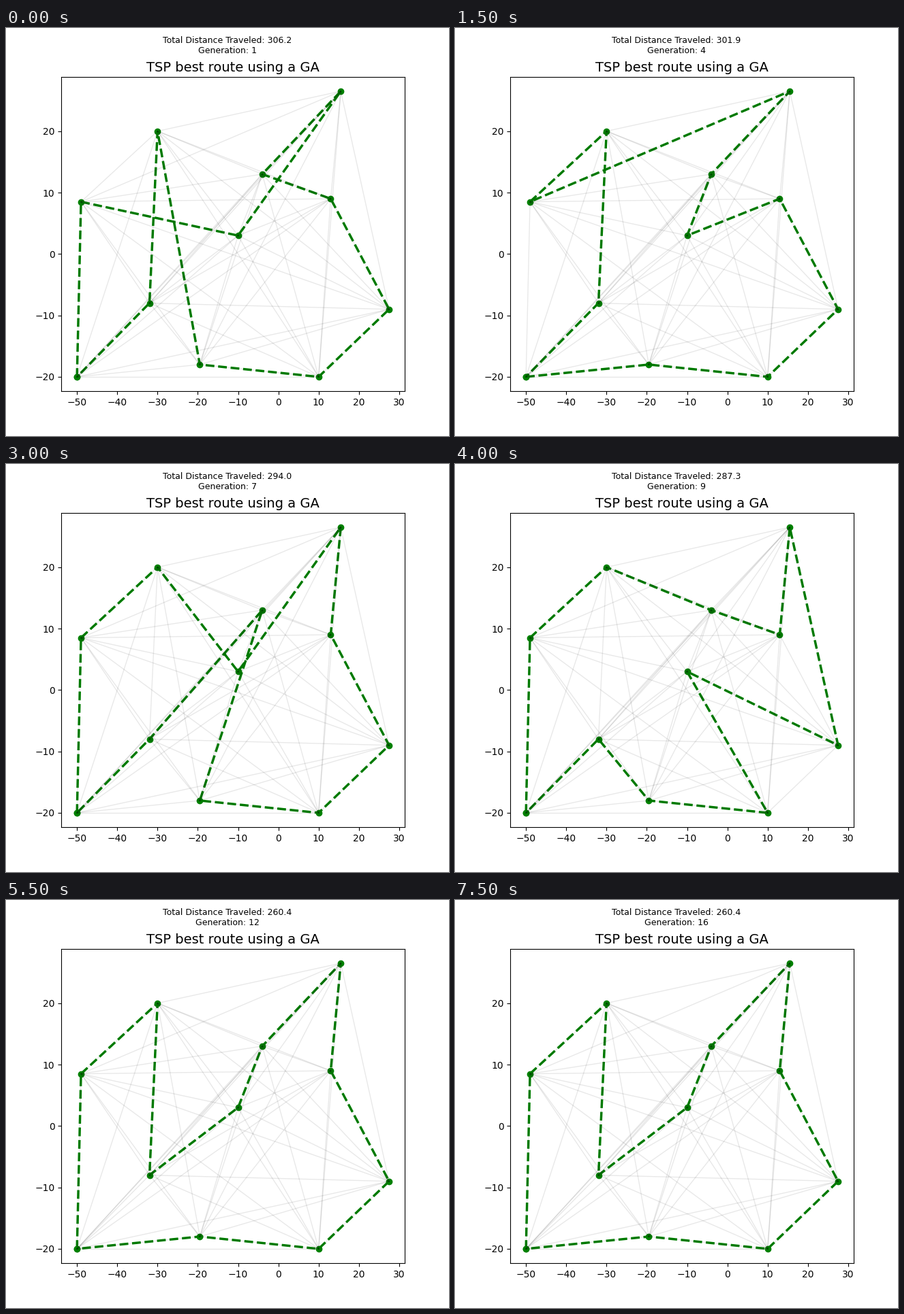
A matplotlib script that plays this animation: 650 by 600 pixels, repeating every 8 s.

```python
from itertools import combinations

import matplotlib.pyplot as plt
import numpy as np
from matplotlib.animation import FuncAnimation

CITIES = {
    "A": (-50, -20), "B": (-49, 8.5), "C": (-30, 20), "D": (-32, -8),
    "E": (-19.5, -18), "F": (10, -20), "G": (27.5, -9), "H": (13, 9),
    "I": (15.5, 26.5), "J": (-4, 13), "K": (-10, 3),
}

# Best tour and the number of generations it leads.
HISTORY = [
    ("ABKIJHGFECD", 1),
    ("AEFGHKIJBCD", 1),
    ("AEFGHKJIBCD", 4),
    ("ABCKIHGFEJD", 2),
    ("ABCJHIGKFED", 1),
    ("AEFGHIJKBCD", 2),
    ("ABCDKJIHGFE", 1),
    ("AEFGHIJKBCD", 1),
    ("ABCDKJIHGFE", 3),
]
BEST = [tour for tour, count in HISTORY for _ in range(count)]


def closed_path(tour):
    return np.array([CITIES[c] for c in tour + tour[0]], dtype=float)


def path_length(path):
    return np.hypot(*np.diff(path, axis=0).T).sum()


fig, ax = plt.subplots(figsize=(6.5, 6), dpi=100)
route, = ax.plot(*closed_path(BEST[0]).T, "--go", linewidth=2.5)
for p, q in combinations(CITIES.values(), 2):
    ax.plot(*zip(p, q), "k-", alpha=0.09, linewidth=1)
ax.set_title("TSP best route using a GA", fontsize=14)
status = fig.suptitle("", fontsize=9)


def update(i):
    path = closed_path(BEST[i])
    route.set_data(*path.T)
    status.set_text(
        f"Total Distance Traveled: {path_length(path):.1f}\nGeneration: {i + 1}"
    )
    return route, status


anim = FuncAnimation(fig, update, frames=len(BEST), interval=500, repeat=True)
plt.show()
```
